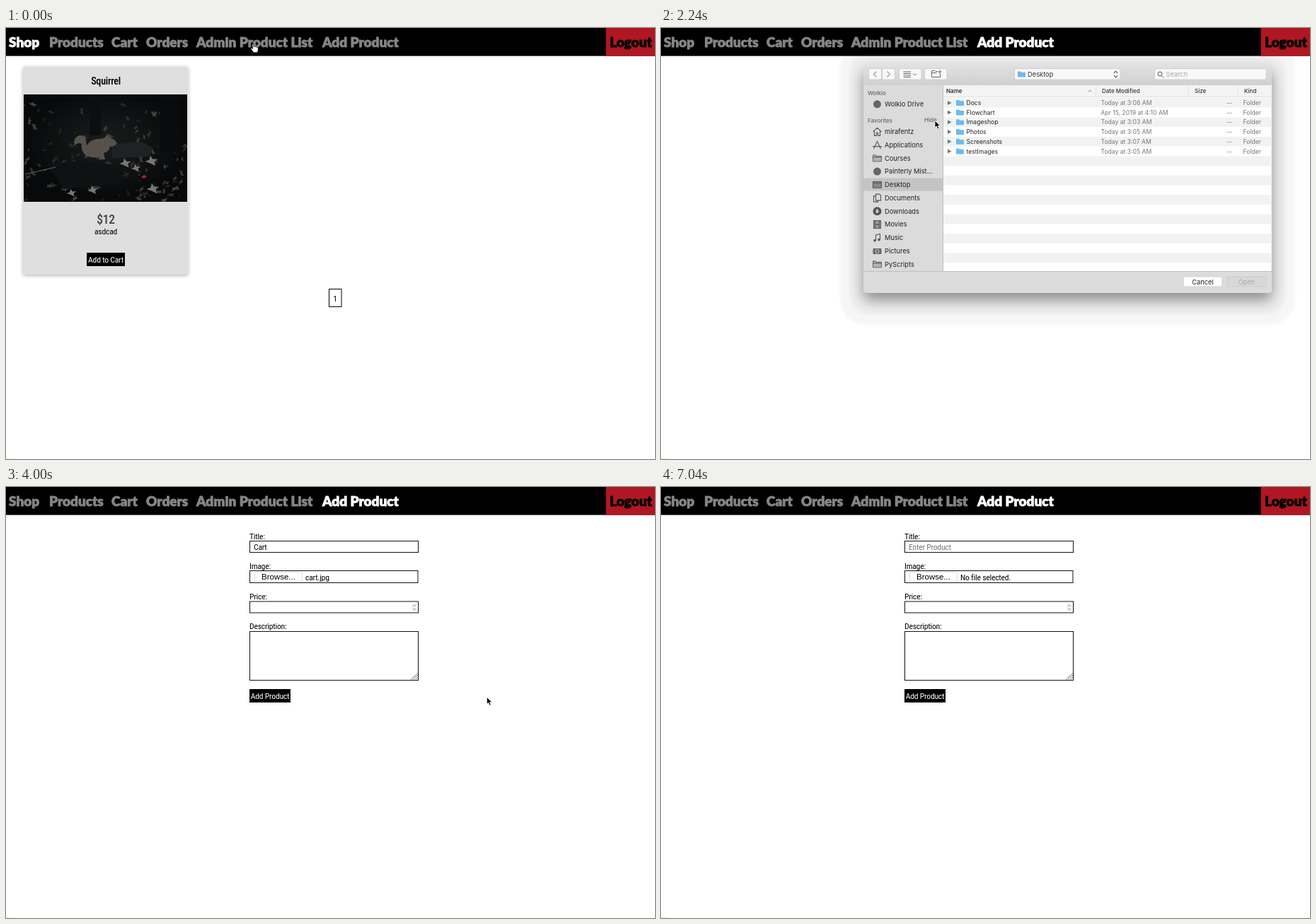
Animation, 917 px wide and 610 px high, one loop 7200 ms. Source, as an HTML page:

```html
<!DOCTYPE html>
<html lang="en">
<head>
<meta charset="utf-8">
<title>Shop admin</title>
<style>
html, body { margin: 0; width: 100%; height: 100%; overflow: hidden; background: #fff; }
svg { display: block; width: 100%; height: 100%; }
.nav { font-family: Lato, sans-serif; font-weight: 900; stroke-width: .8px; }
.page { font-family: "Ubuntu Condensed", "Roboto Condensed", Roboto, sans-serif; font-stretch: 75%; letter-spacing: -.02em; }
.mac { font-family: Inter, sans-serif; }
.btn { font-family: "Liberation Sans", Arial, sans-serif; }
</style>
</head>
<body>
<svg id="stage" viewBox="0 0 917 610" xmlns="http://www.w3.org/2000/svg"></svg>
<script>
const stage = document.getElementById('stage');
const STEP = 160, STEPS = 45;
let fit = 1; // size factor of the condensed page face

const rect = (x, y, w, h, fill, more = '') =>
  `<rect x="${x}" y="${y}" width="${w}" height="${h}" fill="${fill}" ${more}/>`;
const path = (d, fill = 'none', more = '') => `<path d="${d}" fill="${fill}" ${more}/>`;
const text = (cls, size, x, y, s, fill = '#000', more = '') =>
  `<text class="${cls}" font-size="${size}" x="${x}" y="${y}" fill="${fill}" ${more}>${s}</text>`;
const page = (x, y, s, fill, size = 12, more) => text('page', size * fit, x, y, s, fill, more);
const mac = (x, y, s, fill = '#222', size = 8.6, more) => text('mac', size, x, y, s, fill, more);
const MID = 'text-anchor="middle"', END = 'text-anchor="end"', MEDIUM = 'font-weight="500"';
const line = (color, w = 1) => `stroke="${color}" stroke-width="${w}"`;

const DEFS = `<defs>
<clipPath id="photo"><rect x="25" y="94" width="231" height="152"/></clipPath>
<clipPath id="list"><rect x="398.5" y="81" width="464" height="263"/></clipPath>
<radialGradient id="forest" cx=".5" cy=".45"><stop stop-color="#1a1d1e"/><stop offset="1" stop-color="#07090a"/></radialGradient>
<linearGradient id="bar" x2="0" y2="1"><stop stop-color="#e2e2e2"/><stop offset="1" stop-color="#d0d0d0"/></linearGradient>
<filter id="soft" x="-10%" y="-10%" width="120%" height="120%"><feDropShadow dx="0" dy="1.5" stdDeviation="2.5" flood-opacity=".3"/></filter>
<filter id="deep" x="-10%" y="-15%" width="120%" height="140%"><feDropShadow dx="0" dy="10" stdDeviation="10" flood-opacity=".42"/></filter>
<filter id="halo"><feGaussianBlur stdDeviation="2"/></filter>
</defs>`;

function makePhoto() {
  let seed = 7;
  const rnd = () => (seed = seed * 16807 % 2147483647) / 2147483647;
  let s = rect(25, 94, 231, 152, 'url(#forest)');
  for (let i = 0; i < 150; i++) {
    const x = 25 + rnd() * 231, y = 108 + rnd() * 136, c = 25 + rnd() * 48 | 0, r = .4 + rnd() * .7;
    s += path('M-6 0l4-2 1-4 3 3 5 0-3 3 1 4-5-2z', `rgb(${c},${c},${c - 3})`,
      `transform="translate(${x},${y}) rotate(${rnd() * 360}) scale(${r},${r * .6})"`);
  }
  s += rect(118, 94, 16, 58, '#0c0e0f') + rect(218, 94, 26, 80, '#090b0c');
  s += path('M150 165l42-4 16 9-6 12-52 2z', '#1f2222') + path('M60 194q50-12 100 2l6 24-85 8z', '#0f1112');
  for (const [x, y, r] of [[168, 192, 1.1], [205, 189, 1.2], [183, 199, .9], [122, 230, 1], [207, 228, 1.2], [92, 234, .9]])
    s += path('M-7 0l5-2 1-5 3 4 6 0-4 3 1 5-6-3z', '#777773', `transform="translate(${x},${y}) scale(${r})"`);
  s += path('M27 207l43-10', 'none', line('#666')) + path('M191 211l4-3 4 2-4 3z', '#b5202a');
  s += path('M112 180q-7-8-5-16-6-3-10 3-3-12 7-15 9 0 9 8l1 6q5-8 15-9 7 0 11-2l3-5 2 4q8 3 12 9-3 5-10 5-2 8-9 9l2 9h-10l3-3q-11 2-21-3z', '#56514b');
  return `<g clip-path="url(#photo)">${s}</g>`;
}
const PHOTO = makePhoto();

const NAV = [[4, 'Shop'], [61, 'Products'], [149, 'Cart'], [198, 'Orders'], [269, 'Admin Product List'], [447, 'Add Product']];
function nav(active, hover) {
  const item = (x, s, c) => text('nav', 19, x, 27, s, c, `stroke="${c}"`);
  return rect(0, 0, 917, 39.6, '#000') + rect(847.6, 0, 70, 39.6, '#b01722') + item(853, 'Logout', '#000')
    + NAV.map(([x, s], i) => item(x, s, i === active || i === hover ? '#fff' : '#858585')).join('');
}

function shop() {
  return rect(24, 54.5, 233.5, 294.5, '#dfdfdf', 'rx="3" filter="url(#soft)"') + PHOTO
    + page(141, 80, 'Squirrel', '#000', 14.5, MID + ' ' + MEDIUM)
    + page(141, 277, '$12', '#444', 18, MID + ' ' + MEDIUM)
    + page(141, 291.5, 'asdcad', '#000', 12, MID)
    + rect(114, 318, 54, 19, '#000') + page(141, 331.5, 'Add to Cart', '#fff', 12, MID)
    + rect(456.5, 369.5, 17.5, 25, '#fff', line('#000')) + page(465, 386.5, '1', '#000', 12, MID);
}

const empty = () => page(22, 89, 'No Product for Now', '#000', 24);

function form({ title, file, price = '', note = '', caret, badge }) {
  const box = (y, w, h) => rect(344.5, y, w, h, '#fff', line('#111'));
  let s = ['Title', 'Image', 'Price', 'Description'].map((l, i) => page(344, [74, 116, 159, 201][i], l + ':')).join('');
  s += box(76.5, 238, 16) + box(118.5, 237.5, 17) + box(162, 238, 16) + box(204.5, 238, 69);
  s += title ? page(350, 89, title) : page(350, 89, 'Enter Product', '#777');
  s += rect(351.5, 120.5, 67, 13, '#fff', line('#ddd') + ' rx="1"') + text('btn', 11.5, 361, 131, 'Browse...')
    + page(423, 131.5, file || 'No file selected.') + page(350, 174.5, price) + page(350, 216, note);
  s += rect(574, 165.5, 6, 9.5, '#f4f4f4', line('#ddd', .7) + ' rx="2"')
    + path('M575.5 169l1.5-2 1.5 2M575.5 172l1.5 2 1.5-2', 'none', line('#777', .7));
  s += path('M572 272.5l10-9M575 272.5l7-6.5M578.5 272.5l3.5-3.5', 'none', line('#555', .8));
  if (caret) s += rect(372, 206, 1, 12, '#000');
  if (badge) s += '<circle cx="571" cy="262" r="9" fill="#1f7fe0"/>';
  return s + rect(344, 286, 58, 19, '#000') + page(373, 299.5, 'Add Product', '#fff', 12, MID);
}

const folder = (x, y) => path(`M${x} ${y - 4}h4l1 1.3h6v6.7h-11z`, '#6bbaf2');

// Sidebar glyphs, drawn in a 13 x 12 box centred on the origin
const stroke = d => path(d, 'none', line('#555', 1.1));
const dot = '<circle r="5.5" fill="#666"/>';
const dir = path('M-6-4.5h4l1 1.5h7v7.5h-12z', '#b4b4b4', line('#666')) + stroke('M-6-1.5h12');
const SIDE = [
  ['Wolkio Drive', dot],
  ['mirafentz', stroke('M-6 0l6-5.5 6 5.5M-4-1v6.5h3v-4h2v4h3v-6.5')],
  ['Applications', stroke('M-5 5.5l5-10.5 5 10.5M-6.5 2h13')],
  ['Courses', dir],
  ['Painterly Mist...', dot],
  ['Desktop', rect(-6, -4.5, 12, 9, '#888', line('#555')) + stroke('M-6-2.5h12')],
  ['Documents', stroke('M-2-5.5h5l2 2v7h-7zM-2-3h-3v8.5h6v-2')],
  ['Downloads', '<circle r="6" fill="#555"/>' + path('M-1-3h2v3h2l-3 3-3-3h2z', '#ddd')],
  ['Movies', rect(-5, -5.5, 10, 11, '#999', line('#555')) + stroke('M-3-5.5v11M3-5.5v11M-3 0h6')],
  ['Music', stroke('M-2 4v-8l6-1.5v8') + '<circle cx="-3.5" cy="4" r="1.8" fill="#555"/><circle cx="2.5" cy="2.8" r="1.8" fill="#555"/>'],
  ['Pictures', rect(-6, -3.5, 12, 8, '#666', 'rx="1"') + '<circle cy=".5" r="2.5" fill="none" stroke="#ddd"/>'],
  ['PyScripts', dir]
];
const FOLDERS = [['Docs', 'Today at 3:06 AM'], ['Flowchart', 'Apr 15, 2019 at 4:10 AM'], ['Imageshop', 'Today at 3:03 AM'],
  ['Photos', 'Today at 3:05 AM'], ['Screenshots', 'Today at 3:07 AM'], ['testImages', 'Today at 3:05 AM']];
const IMAGES = [['cart.jpg', 'Nov 21, 2018 at 6:19 PM', '1.1 MB'], ['DSC05527.jpg', 'Aug 21, 2018 at 1:32 PM', '2.7 MB'],
  ['DSC05692.jpg', 'Aug 23, 2018 at 10:57 PM', '1.6 MB'], ['DSC06134.jpg', 'Nov 21, 2018 at 6:35 PM', '1 MB']];

function fileList(inside, picked) {
  const H = 13.72, top = 98.9;
  let s = rect(398, 81, 465, 263, '#fff') + rect(398, 81, 465, 16.5, '#f3f3f3');
  for (let i = 0; i < 18; i++)
    if (i === picked || i % 2 === 0) s += rect(398, top + i * H, 465, i === picked ? 13 : H, i === picked ? '#0a63dd' : '#f1f3f3');
  (inside ? IMAGES : FOLDERS).forEach(([name, date, size = '--'], i) => {
    const y = top + i * H + 7, on = i === picked, soft = on ? '#dfeaff' : '#777';
    s += inside ? rect(418, y - 4, 10, 8, '#222', line('#999', .7)) + rect(420, y - 1, 6, 2, '#777')
      : path(`M405 ${y - 3}l5.5 3-5.5 3z`, on ? '#fff' : '#777') + folder(417, y);
    s += mac(431.5, y + 3, name, on ? '#fff' : '#222') + mac(621.5, y + 3, date, soft)
      + mac(807, y + 3, size, soft, 8.6, END) + mac(822.5, y + 3, inside ? 'JPEG image' : 'Folder', soft);
  });
  s += path('M398 97.5h465M614.5 82v14M745.5 82v14M815.5 82v14', 'none', line('#ddd', .8))
    + path('M603.5 90.5l2.5-2.5 2.5 2.5', 'none', line('#777', .8));
  [[403, 'Name'], [623, 'Date Modified'], [754, 'Size'], [824, 'Kind']].forEach(([x, l], i) =>
    s += mac(x, 92, l, '#333', 8, `font-weight="${i ? 500 : 600}"`));
  return `<g clip-path="url(#list)">${s}</g>`;
}

function dialog({ inside, picked, hide, scale = 1, alpha = 1 }) {
  const button = (x, w, y = 57.5, h = 15.5, fill = '#f8f8f8') => rect(x, y, w, h, fill, line('#c4c4c4', .7) + ' rx="2.5"');
  const ready = inside && picked >= 0;
  const heading = (x, y, s) => mac(x, y, s, '#666', 8, MEDIUM);
  let s = rect(253, 20, 643, 400, '#000', 'rx="36" opacity=".03" filter="url(#halo)"')
    + rect(266, 34, 617, 372, '#000', 'rx="28" opacity=".025" filter="url(#halo)"')
    + rect(286, 50.5, 577, 324.5, '#dcdcdc', 'rx="5" filter="url(#deep)"')
    + rect(286.5, 51, 576, 30, 'url(#bar)', 'rx="4"') + rect(286, 81, 112, 263, '#dbdbdb');
  s += button(293.5, 18) + button(312.5, 18) + button(336.5, 31.5) + button(372.5, 31.5)
    + path('M304.5 61.5l-4 4 4 4', 'none', line(inside ? '#333' : '#999', 1.1))
    + path('M319.5 61.5l4 4-4 4', 'none', line('#999', 1.1))
    + path('M342.5 62h10.5M342.5 64.5h10.5M342.5 67h10.5M342.5 69.5h10.5M356 64.5l2.5 2.5 2.5-2.5', 'none', line('#555', .9))
    + path('M391 61.5h-3l-1-1h-4.500v9h12v-5M382.500 63.500h7M391.500 62h5M394 59.500v5', 'none', line('#555', .9));
  s += button(499.5, 149.5) + folder(504, 65.5) + mac(518, 69, inside ? 'testImages' : 'Desktop', '#333', 9.3)
    + path('M640 64l2.5-3 2.5 3M640 67l2.5 3 2.5-3', 'none', line('#444', 1.1));
  s += button(697.5, 157.5) + '<circle cx="705" cy="65" r="3" fill="none" stroke="#555"/>'
    + path('M707 67.5l3 3', 'none', line('#555')) + mac(713.5, 69, 'Search', '#aaa', 9.3);
  s += heading(292, 94.5, 'Wolkio') + heading(292, 133.5, 'Favorites');
  if (hide) s += heading(372, 133, 'Hide');
  if (!inside) s += rect(286, 212.5, 112, 18, '#c4c4c4');
  SIDE.forEach(([name, icon], i) => {
    const y = i ? 128.1 + i * 18.75 : 107.8;
    s += `<g transform="translate(305.5,${y})">${icon}</g>` + mac(316, y + 3.3, name, '#222', 9.3);
  });
  s += fileList(inside, picked) + path('M398.5 81v263M286 344.5h577', 'none', line('#c0c0c0'));
  s += button(738, 55, 352, 14, '#fff') + mac(765.5, 362.7, 'Cancel', '#222', 9.3, MID)
    + button(800, 55, 352, 14, ready ? '#0a63dd' : '#d8d8d8') + mac(827.5, 362.7, 'Open', ready ? '#fff' : '#aaa', 9.3, MID);
  return `<g opacity="${alpha}" transform="translate(574.5 212) scale(${scale}) translate(-574.5 -212)">${s}</g>`;
}

const ARROW = path('M0 0v10l2.3-2 1.7 3.8 1.9-.8-1.7-3.7h3.2z', '#000', line('#fff', .8));
const HAND = path('M1 0q-1.5 0-1.2 1.5l1.2 5-2-1.2q-1.5 0-.8 1.5l3.8 5h5l1.2-3v-4q-1-1.5-2-.5-1-1.5-2-.5-1-1.2-2-.3l-.5-2.5q-.2-1-.7-1z', '#fff', line('#222', .8));

// Pointer stops: step, x, y; a lone step hides the pointer
const STOPS = [[0, 348, 23], [1, 350, 23], [4, 493, 22], [7, 493, 22], [9, 400, 84], [10], [12, 388, 112], [13, 379, 125],
  [14, 387, 131], [16, 450, 173], [18, 450, 173], [20, 448, 104], [21, 470, 122], [23, 819, 362], [24, 819, 362],
  [27, 400, 168], [28], [30, 392, 188], [31, 400, 214], [32], [36, 385, 258], [37, 372, 293], [39, 372, 293],
  [41, 345, 23], [42, 168, 23], [43, 480, 412], [44]];
function pointer(n) {
  const i = STOPS.findLastIndex(p => p[0] <= n);
  const [a, x, y] = STOPS[i], [b, u, v] = STOPS[i + 1] || [];
  if (x === undefined) return '';
  const k = u === undefined ? 0 : (n - a) / (b - a);
  return `<g transform="translate(${x + (u - x || 0) * k},${y + (v - y || 0) * k})">${n < 4 ? HAND : ARROW}</g>`;
}

function scene(n) {
  const typed = (word, from, rate) => word.slice(0, Math.max(0, Math.ceil((n - from + 1) * rate)));
  let s = DEFS + rect(0, 0, 917, 610, '#fff') + rect(0, 609, 11, 1, '#eee');
  if (n < 7) {
    s += (n ? empty() : shop()) + nav(n ? 4 : 0, n > 3 ? 5 : -1);
  } else {
    const sent = n >= 39;
    s += form(sent ? {} : {
      title: typed('Cart', 10, 2), file: n >= 24 && 'cart.jpg', price: typed('34', 28, 1),
      note: typed('fasdfasdf', 32, 2.5), caret: n === 33, badge: n >= 31
    });
    if (n >= 13 && n <= 24) {
      const inside = n >= 18;
      s += dialog({
        inside, hide: n === 14, picked: inside ? (n >= 20 ? 0 : -1) : (n >= 16 ? 5 : -1),
        scale: n === 13 ? .37 : 1, alpha: n === 13 ? .32 : n === 24 ? .35 : 1
      });
    }
    s += nav(5, n === 41 ? 4 : n === 42 ? 2 : -1);
  }
  return s + pointer(n);
}

stage.innerHTML = empty();
fit = Math.min(1, 174 / stage.firstChild.getComputedTextLength());

let shown = -1;
function tick() {
  const n = Math.floor(performance.now() / STEP) % STEPS;
  if (n !== shown) stage.innerHTML = scene(shown = n);
  requestAnimationFrame(tick);
}
tick();
</script>
</body>
</html>
```
